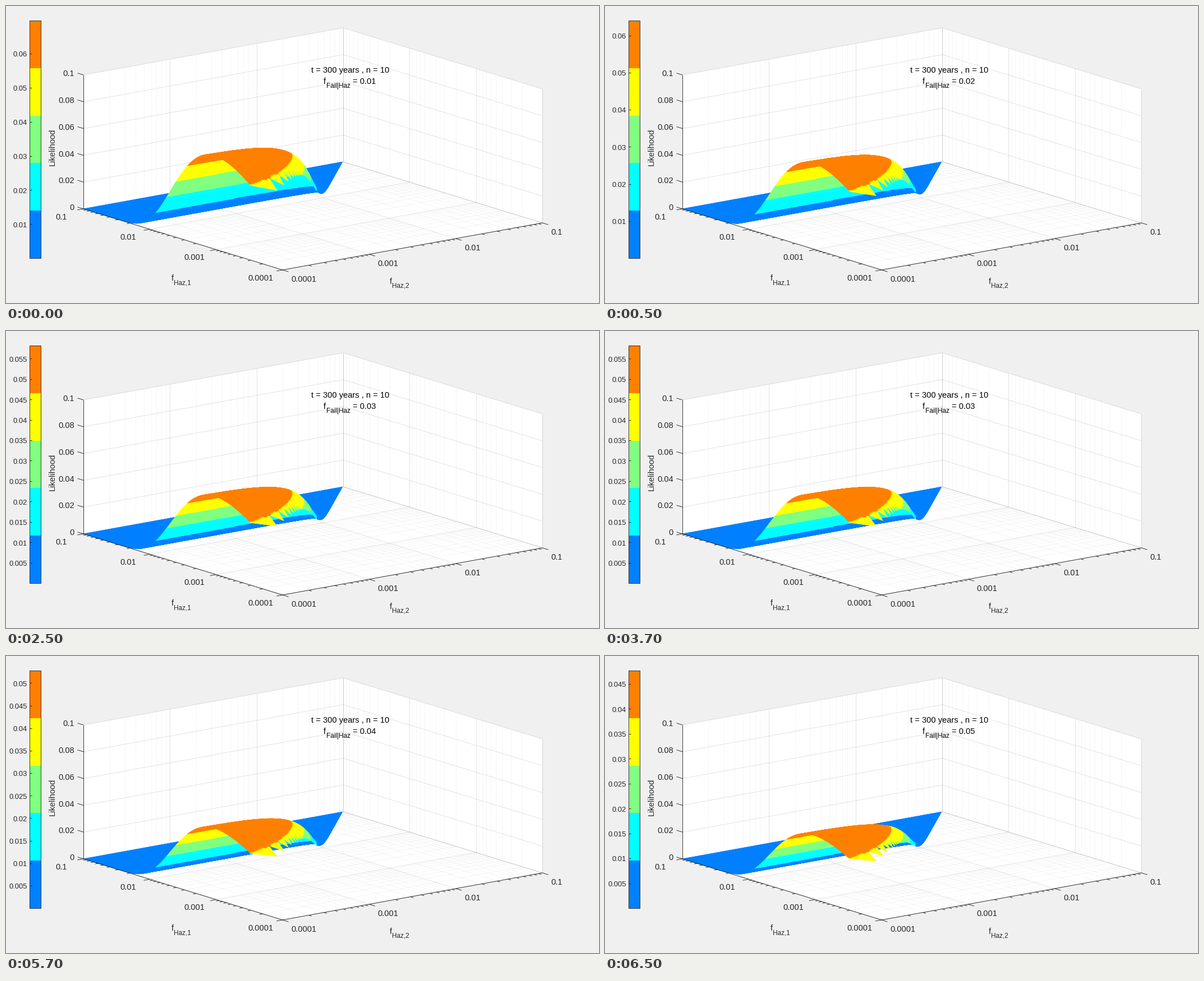
A matplotlib script for the animation above (8000 ms loop, 1057x530 px).

```python
import numpy as np
import matplotlib.pyplot as plt
from matplotlib.animation import FuncAnimation
from matplotlib.collections import LineCollection, PolyCollection
from matplotlib.patches import Polygon, Rectangle

W, H, DPI = 1057, 530, 100
PX = 72 / DPI
INK = "#262626"
BANDS = np.array(["#0080ff", "#00ffff", "#80ff80", "#ffff00", "#ff8000"])
PEAKS = [0.0697, 0.0640, 0.0582, 0.0528, 0.0477]

plt.rcParams["font.family"] = "Liberation Sans"
fig = plt.figure(figsize=(W / DPI, H / DPI), dpi=DPI, facecolor="#f0f0f0")
ax = fig.add_axes([0, 0, 1, 1])
ax.set_xlim(0, W)
ax.set_ylim(H, 0)
ax.axis("off")

# Screen basis: u runs from 0.1 to 0.0001 on axis 1, v from 0.0001 to 0.1 on axis 2
ORIGIN = np.array([138, 362])
U, V = np.array([355, 109]), np.array([463, -84])
Z_PX = 2390


def pos(u, v, z=0.0):
    return ORIGIN + u * U + v * V - np.array([0, z * Z_PX])


def text(x, y, s, ha="left", size=14.67, color=INK):
    return ax.text(x, y + 0.36 * size, s, ha=ha, va="baseline",
                   fontsize=size * PX, color=color, zorder=6)


def symbol(x, y, sub, color=INK):
    text(x, y, "f", color=color)
    text(x + 4.3, y + 8, sub, size=11.7, color=color)


def lines(segs, width=1.0, alpha=1.0, style="solid", z=1):
    ax.add_collection(LineCollection(segs, colors=INK, linewidths=width * PX,
                                     alpha=alpha, linestyles=style, zorder=z))


# Walls, floor and grid
major = [0, 1 / 3, 2 / 3, 1]
minor = [(d + np.log10(k)) / 3 for d in range(3) for k in range(2, 10)]
heights = np.arange(6) * 0.02

for face in ([(0, 0, 0), (0, 1, 0), (0, 1, .1), (0, 0, .1)],
             [(0, 1, 0), (1, 1, 0), (1, 1, .1), (0, 1, .1)],
             [(0, 0, 0), (0, 1, 0), (1, 1, 0), (1, 0, 0)]):
    ax.add_patch(Polygon([pos(*p) for p in face], fc="white", lw=0, zorder=0))


def grid(ticks):
    segs = []
    for t in ticks:
        segs += [(pos(0, t), pos(1, t)), (pos(1 - t, 0), pos(1 - t, 1)),
                 (pos(0, t), pos(0, t, .1)), (pos(1 - t, 1), pos(1 - t, 1, .1))]
    return segs


lines(grid(major), alpha=0.13)
lines([(pos(0, 0, h), pos(0, 1, h)) for h in heights]
      + [(pos(0, 1, h), pos(1, 1, h)) for h in heights], alpha=0.13)
lines(grid(minor), width=0.7, alpha=0.18, style=(0, (1, 2)))

# Axis lines and outward ticks
lines([(pos(0, 0), pos(0, 0, .1)), (pos(0, 0), pos(1, 0)),
       (pos(1, 0), pos(1, 1))], width=0.9, z=4)
du, dv = U / np.hypot(*U), V / np.hypot(*V)
ticks = [(pos(0, 0, h), pos(0, 0, h) - 11 * du) for h in heights]
for marks, size in ((major, 11), (minor, 5.5)):
    for t in marks:
        ticks += [(pos(1 - t, 0), pos(1 - t, 0) - size * dv),
                  (pos(1, t), pos(1, t) + size * du)]
lines(ticks, width=0.9, z=4)

for h in heights:
    text(122, pos(0, 0, h)[1] - 3, f"{h:.2g}", "right")
for n, name in enumerate(("0.0001", "0.001", "0.01", "0.1")):
    x, y = pos(1 - n / 3, 0)
    text(x - 39, y + 13.5, name, "center")
    x, y = pos(1, n / 3)
    text(x + 15.5, y + 15.5, name)

ax.text(83, 252, "Likelihood", rotation=90, ha="center", va="center",
        fontsize=14.67 * PX, color=INK, zorder=6)
symbol(294.5, 485, "Haz,1")
symbol(683.5, 490.5, "Haz,2")
text(613.5, 113.5, "t = 300 years , n = 10", "center", color="black")
symbol(566.3, 133.5, "Fail|Haz", color="black")
value = text(618, 133.5, "", color="black")

# Likelihood over f1 > f2, frequencies in units of 0.0001
freq = np.r_[1:60, np.geomspace(60, 1000, 161)]
f1, f2 = np.meshgrid(freq, freq, indexing="ij")
ratio = np.minimum(f2 / f1, 1)
like = (1 - ratio ** 1.5) ** 0.24 * f1 ** 0.34 * np.exp(-0.033 * f1)
like /= like.max()
u, v = 1 - np.log10(f1) / 3, np.log10(f2) / 3
mesh = np.stack([ORIGIN[0] + u * U[0] + v * V[0],
                 ORIGIN[1] + u * U[1] + v * V[1], like], axis=-1)


def patches(i, j, m):
    """Cells (i, j), each split into m x m quads by bilinear interpolation."""
    def at(s, t):
        return ((1 - s) * (1 - t) * mesh[i, j] + s * (1 - t) * mesh[i + 1, j]
                + s * t * mesh[i + 1, j + 1] + (1 - s) * t * mesh[i, j + 1])
    steps = np.arange(m) / m
    e = 1 / m
    return np.concatenate([
        np.stack([at(s, t), at(s + e, t), at(s + e, t + e), at(s, t + e)], axis=1)
        for s in steps for t in steps])


row, col = np.indices((len(freq) - 1, len(freq) - 1)).reshape(2, -1)
valid = row >= col + 2
row, col = row[valid], col[valid]
parts = []
for lo, hi, m in ((0, 16, 8), (16, 60, 2), (60, len(freq), 1)):
    pick = (row >= lo) & (row < hi)
    parts.append(patches(row[pick], col[pick], m))
quads = np.concatenate(parts)
quads = quads[np.argsort(quads[:, :, 1].mean(axis=1))]
level = np.clip((quads[:, :, 2].mean(axis=1) * 5).astype(int), 0, 4)


def surface(peak):
    xy = quads[:, :, :2].copy()
    xy[:, :, 1] -= quads[:, :, 2] * peak * Z_PX
    c = PolyCollection(xy, facecolors=BANDS[level], edgecolors="face",
                       linewidths=0.7 * PX, zorder=3, visible=False)
    return ax.add_collection(c)


# Colour bar
TOP, BOTTOM, LEFT, WIDE = 26, 450, 42.4, 20
for n, c in enumerate(BANDS):
    step = (BOTTOM - TOP) / 5
    ax.add_patch(Rectangle((LEFT, BOTTOM - (n + 1) * step), WIDE, step,
                           fc=c, lw=0, zorder=3))
ax.add_patch(Rectangle((LEFT, TOP), WIDE, BOTTOM - TOP, fc="none", ec=INK,
                       lw=0.9 * PX, zorder=4))


def scale(peak):
    step = 0.01 if peak > 0.06 else 0.005
    items, marks = [], []
    for val in np.arange(step, peak, step):
        y = BOTTOM - val / peak * (BOTTOM - TOP)
        marks.append([(LEFT, y), (LEFT + 4, y)])
        items.append(text(37.8, y + 0.7, f"{val:.3g}", "right", size=13))
    bar = LineCollection(marks, colors=INK, linewidths=0.9 * PX, zorder=5)
    items.append(ax.add_collection(bar))
    return items


scenes = [[surface(p)] + scale(p) for p in PEAKS]


def update(k):
    now = 0 if k < 1 else 1 + (k - 1) // 4
    for n, scene in enumerate(scenes):
        for part in scene:
            part.set_visible(n == now)
    value.set_text(f"= {0.01 * (now + 1):.2f}")
    return []


anim = FuncAnimation(fig, update, frames=16, interval=500, repeat=True,
                     repeat_delay=0, blit=False)
plt.show()
```
